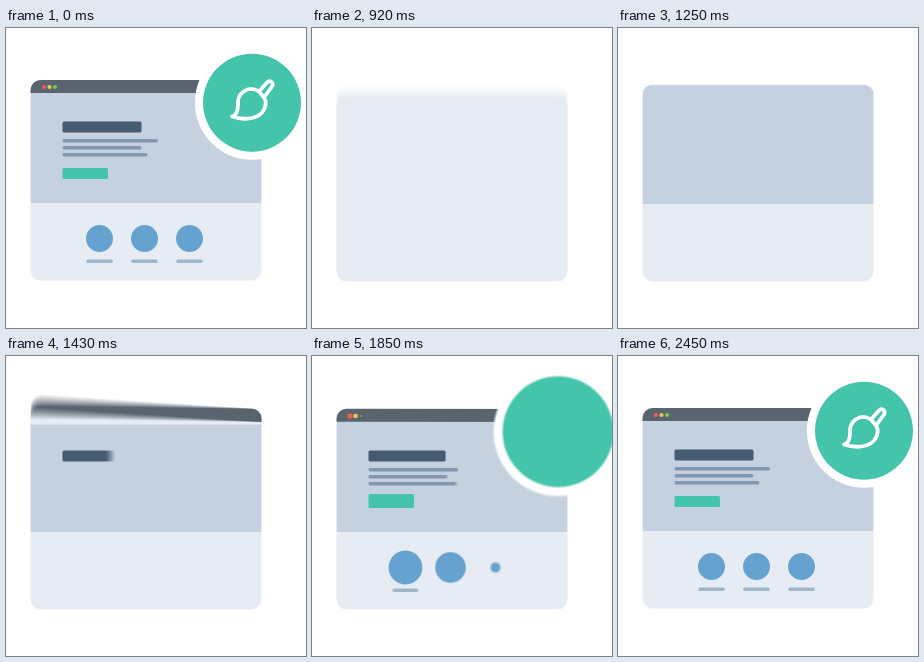
Recreate the animation shown at these times as an HTML page with a canvas. Size 300 by 300 pixels, loop 3020 ms.

```html
<!DOCTYPE html>
<html lang="en">
<head>
<meta charset="utf-8">
<title>Page builder</title>
<style>
html, body { margin: 0; height: 100%; overflow: hidden; background: #fff; }
canvas { display: block; }
</style>
</head>
<body>
<canvas id="stage" width="300" height="300"></canvas>
<script>
const LOOP = 3020, START = 800, STEP = 30, END = 2450;
const SHUTTER = 14, SAMPLES = 12;
const BLUE = '#65a2cf', GREEN = '#43c4ab', LINE = '#a0b6c8', TEXT = '#8398ae';

const stage = document.getElementById('stage').getContext('2d');
const scene = document.createElement('canvas');
scene.width = scene.height = 300;
const g = scene.getContext('2d');

const brush = new Path2D(
  'M7 -9 C-4 -16 -15 -7 -14 4 C-14 11 -16 15 -20 16 C-8 20 7 19 12 9 C15 3 14 0 12 -3 Z' +
  'M7 -9 L15 -18 C18 -21 22 -18 20 -14 L12 -3');

let now = 0;

// Damped spring from 0 to 1; stays 0 before its start.
function spring(start, freq = 0.021, damp = 0.0092) {
  const t = now - start;
  return t <= 0 ? 0 : 1 - Math.exp(-damp * t) * Math.cos(freq * t);
}
const softSpring = start => spring(start, 0.0135, 0.0075);

function box(x, y, w, h, radius, color) {
  if (w <= 0 || h <= 0) return;
  g.beginPath();
  g.roundRect(x, y, w, h, radius);
  g.fillStyle = color;
  g.fill();
}

function disc(x, y, r, color) {
  if (r <= 0) return;
  g.beginPath();
  g.arc(x, y, r, 0, 7);
  g.fillStyle = color;
  g.fill();
}

function drawPage() {
  const height = 200.5 * spring(815, 0.0135, 0.009);
  const hero = 110.5 * softSpring(957);
  g.save();
  box(24.5, 253.5 - height, 231, height, 10, '#e7ecf4');
  g.clip();
  box(24.5, 176 - hero, 231, hero, 0, '#c6d1df');
  g.restore();

  if (now > 1304) {
    g.save();
    g.translate(255.5, 66);
    g.rotate(Math.PI / 2 * (1 - spring(1304, 0.0115, 0.013)));
    box(-231, -13, 231, 13, [10, 10, 0, 0], '#59646f');
    g.restore();
  }
}

function drawContent() {
  disc(38, 60, 2.1 * spring(1700), '#ee5e55');
  disc(43.5, 60, 2.1 * spring(1765), '#f2c94c');
  disc(49, 60, 2.1 * spring(1818), '#7cc65a');

  box(56.5, 94.5, 79 * softSpring(1365), 11, 1.5, '#445b70');
  box(56.5, 112, 95.5 * spring(1550), 3.5, 1.7, TEXT);
  box(56.5, 119, 79 * spring(1624), 3.5, 1.7, TEXT);
  box(56.5, 126, 85 * spring(1638), 3.5, 1.7, TEXT);

  const button = 11 * spring(1710);
  box(56.5, 152 - button, 45.5, button, 1.5, GREEN);

  for (let i = 0; i < 3; i++) {
    const x = 93.5 + 45 * i;
    disc(x, 211.5, 13.5 * spring(1700 + 61 * i), BLUE);
    const width = 26.5 * spring(1778 + 152 * i);
    box(x - width / 2, 232.5, width, 3.5, 1.7, LINE);
  }
}

function drawBadge(resting) {
  const size = spring(1670) * (resting ? 1.02 : 1);
  disc(246, 75.7, 56 * size, '#fff');
  disc(246, 75.7, 48 * size, GREEN);

  const scale = spring(1985);
  if (scale <= 0) return;
  g.save();
  g.translate(246, 73.5);
  g.scale(scale, scale);
  g.strokeStyle = '#fff';
  g.lineWidth = 3.8;
  g.lineJoin = g.lineCap = 'round';
  g.stroke(brush);
  g.restore();
}

function drawScene(time, resting) {
  now = time;
  g.fillStyle = '#fff';
  g.fillRect(0, 0, 300, 300);
  g.save();
  if (resting) g.translate(0, -1);
  drawPage();
  drawContent();
  drawBadge(resting);
  g.restore();
}

function render(time) {
  const t = time % LOOP;
  const resting = t < START || t >= END;
  const pose = START + Math.floor((t - START) / STEP) * STEP;
  const count = resting ? 1 : SAMPLES;
  // Averaging several moments gives the motion blur.
  for (let i = 0; i < count; i++) {
    const offset = ((i + 0.5) / count - 0.5) * SHUTTER;
    drawScene(resting ? 1e5 : pose + offset, resting);
    stage.globalAlpha = 1 / (i + 1);
    stage.drawImage(scene, 0, 0);
  }
}

let origin;
function tick(time) {
  origin ??= time;
  render(time - origin);
  requestAnimationFrame(tick);
}
render(0);
requestAnimationFrame(tick);
</script>
</body>
</html>
```
